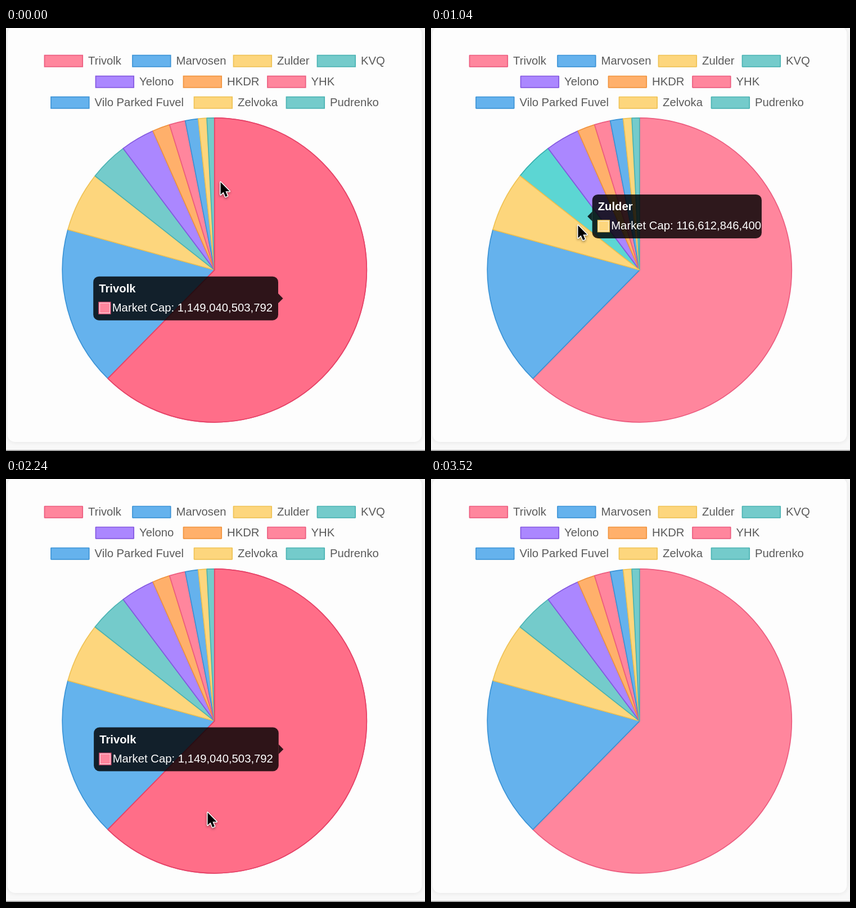
Animation of 745x752 px, one loop 3.6 s. Source, as an HTML page with a canvas:

```html
<!DOCTYPE html>
<html lang="en">
<head>
<meta charset="utf-8">
<style>
  html, body { margin: 0; width: 100%; height: 100%; overflow: hidden; background: #f8f8f8; }
  canvas { display: block; }
</style>
</head>
<body>
<canvas id="stage" width="745" height="752"></canvas>
<script>
const ctx = document.getElementById('stage').getContext('2d');
const LOOP = 3600, STEP = 80, LEAVE = 3000;
const CX = 370.8, CY = 430.3, R = 270.5;
const FONT = '20.3px "Liberation Sans", Arial, sans-serif';

// fill, border, hovered fill, hovered border
const RED = ['#ff869d', '#ec5c7f', '#ff6e89', '#e64267'];
const BLUE = ['#65b2ed', '#3b93d6', '#47acff', '#2e8bd8'];
const YELLOW = ['#fdd67d', '#efc255', '#ffd26e', '#eebb45'];
const TEAL = ['#74cbcb', '#4bb3b3', '#5bd7d4', '#37b0ae'];
const PURPLE = ['#ab87ff', '#8458e0', '#a57aff', '#7c4de0'];
const ORANGE = ['#ffb06b', '#f0943f', '#f9a456', '#ea8730'];

// name, value, palette, legend x, legend y
const slices = [
  ['Trivolk', 1149040503792, RED, 68.5, 48.5],
  ['Marvosen', 311748134198, BLUE, 225, 48.5],
  ['Zulder', 116612846400, YELLOW, 404.5, 48.5],
  ['KVQ', 76023415207, TEAL, 553.5, 48.5],
  ['Yelono', 66648898993, PURPLE, 159.5, 85.5],
  ['HKDR', 34312450376, ORANGE, 315.5, 85.5],
  ['YHK', 31204718265, RED, 465, 85.5],
  ['Vilo Parked Fuvel', 25318604912, BLUE, 80, 122.5],
  ['Zelvoka', 16702385144, YELLOW, 334.5, 122.5],
  ['Pudrenko', 14836271950, TEAL, 498.5, 122.5],
].map(([name, value, colors, lx, ly]) => ({
  name, value, colors, lx, ly, label: 'Market Cap: ' + value.toLocaleString('en-US'),
}));

ctx.font = FONT;
const total = slices.reduce((sum, s) => sum + s.value, 0);
let angle = -Math.PI / 2;
for (const s of slices) {
  s.start = angle;
  s.end = angle += s.value / total * 2 * Math.PI;
  const mid = (s.start + s.end) / 2;
  const px = CX + Math.cos(mid) * R / 2, w = ctx.measureText(s.label).width + 43.5;
  s.onRight = px > CX;
  s.box = [s.onRight ? px - 12 - w : px + 12, CY - 0.9 + Math.sin(mid) * R / 2, w];
}

// [time, hovered slice]
const hovers = [[-999, 0], [120, 9], [180, 8], [230, 7], [300, 6], [390, 5],
  [532, 4], [760, 3], [1033, 2], [1300, 1], [1965, 0]];
// [time, x, y]
const path = [[0, 381, 272], [560, 301, 298], [1040, 261, 349], [1400, 240, 440],
  [1760, 275, 537], [2240, 358, 591], [2440, 372, 594]];

const clamp = v => Math.min(1, Math.max(0, v));
const easeOut = ms => 1 - (1 - clamp(ms / 400)) ** 4;
const mix = (a, b, p) => a.map((v, i) => v + (b[i] - v) * p);
const hoverEnd = i => i + 1 < hovers.length ? hovers[i + 1][0] : LEAVE;

function hoverLevel(slice, t) {
  let level = 0;
  hovers.forEach(([start, index], i) => {
    if (index !== slice || t < start) return;
    const end = hoverEnd(i);
    level = Math.max(level, easeOut(Math.min(t, end) - start) * (1 - easeOut(t - end)));
  });
  return level;
}

function tooltipState(t) {
  let box = slices[0].box, current = slices[0];
  hovers.forEach(([start, index], i) => {
    if (t < start) return;
    current = slices[index];
    box = mix(box, current.box, easeOut(Math.min(t, hoverEnd(i)) - start));
  });
  return { box, current };
}

function cursorAt(t) {
  const i = path.findIndex((p, k) => k < path.length - 1 && t < path[k + 1][0]);
  if (i < 0) return null;
  const slope = k => {
    const a = path[Math.max(0, k - 1)], b = path[Math.min(path.length - 1, k + 1)];
    return [1, 2].map(c => (b[c] - a[c]) / (b[0] - a[0]));
  };
  const [a, b] = [path[i], path[i + 1]], d = b[0] - a[0], u = (t - a[0]) / d;
  const ma = slope(i), mb = slope(i + 1);
  return [0, 1].map(c => (1 + 2 * u) * (1 - u) ** 2 * a[c + 1] + u * (1 - u) ** 2 * d * ma[c]
    + u * u * (3 - 2 * u) * b[c + 1] + u * u * (u - 1) * d * mb[c]);
}

function polygon(...points) {
  ctx.beginPath();
  for (let i = 0; i < points.length; i += 2) ctx.lineTo(points[i], points[i + 1]);
  ctx.closePath();
}

function text(str, x, y, color, bold) {
  ctx.font = (bold ? 'bold ' : '') + FONT;
  ctx.fillStyle = color;
  ctx.fillText(str, x, y);
}

function drawPage() {
  ctx.fillStyle = '#f8f8f8';
  ctx.fillRect(0, 0, 745, 752);
  ctx.save();
  ctx.shadowColor = 'rgba(0,0,0,.09)';
  ctx.shadowBlur = 9;
  ctx.fillStyle = '#fdfdfd';
  ctx.beginPath();
  ctx.roundRect(2.5, -3, 737, 739, 14);
  ctx.fill();
  ctx.restore();
  ctx.fillStyle = '#8c8c8c';
  ctx.fillRect(0, 750.3, 745, 1.5);
  ctx.lineWidth = 1.7;
  for (const { name, colors, lx, ly } of slices) {
    ctx.fillStyle = colors[0];
    ctx.strokeStyle = colors[1];
    ctx.fillRect(lx, ly, 67.7, 20.3);
    ctx.strokeRect(lx, ly, 67.7, 20.3);
    text(name, lx + 77.5, ly + 16.5, '#5a5a5a');
  }
}

function drawSlice({ start, end, colors }, level) {
  ctx.beginPath();
  ctx.moveTo(CX, CY);
  ctx.arc(CX, CY, R, start, end);
  ctx.closePath();
  ctx.lineWidth = 1.7;
  ctx.lineJoin = 'bevel';
  for (const [k, alpha] of [[0, 1], [2, level]]) {
    ctx.globalAlpha = alpha;
    ctx.fillStyle = colors[k];
    ctx.strokeStyle = colors[k + 1];
    ctx.fill();
    ctx.stroke();
  }
  ctx.globalAlpha = 1;
}

function drawTooltip(t) {
  const { box: [x, cy, w], current } = tooltipState(t);
  const y = cy - 39, colors = current.colors;
  ctx.globalAlpha = 1 - clamp((t - LEAVE) / 200);
  ctx.fillStyle = 'rgba(0,0,0,.82)';
  const edge = current.onRight ? x + w : x, tip = edge + (current.onRight ? 8.6 : -8.6);
  ctx.beginPath();
  ctx.roundRect(x, y, w, 78, 10);
  ctx.fill();
  polygon(edge, cy - 8.6, tip, cy, edge, cy + 8.6);
  ctx.fill();
  text(current.name, x + 10, y + 28.3, '#fff', true);
  const square = (inset, color) => {
    ctx.fillStyle = color;
    ctx.fillRect(x + 10 + inset, y + 46 + inset, 20.4 - 2 * inset, 20.4 - 2 * inset);
  };
  square(-0.85, colors[1]);
  square(0.85, '#fff');
  square(1.7, colors[0]);
  text(current.label, x + 33.5, y + 62.3, '#fff');
  ctx.globalAlpha = 1;
}

function drawCursor([x, y]) {
  ctx.save();
  ctx.translate(x + 0.5, y + 1);
  ctx.scale(0.95, 0.95);
  polygon(0, 1, 0, 24.5, 5.4, 19.6, 9.2, 28.4, 13, 26.8, 9.3, 18.2, 16.8, 18.2);
  ctx.lineJoin = 'round';
  ctx.lineWidth = 3.2;
  ctx.strokeStyle = '#fff';
  ctx.shadowColor = 'rgba(0,0,0,.4)';
  ctx.shadowBlur = 4;
  ctx.shadowOffsetY = 2;
  ctx.stroke();
  ctx.shadowColor = 'transparent';
  ctx.fillStyle = '#000';
  ctx.fill();
  ctx.restore();
}

function draw(now) {
  const t = Math.floor(now % LOOP / STEP) * STEP;
  drawPage();
  const { current } = tooltipState(t);
  const active = t < LEAVE ? current : null;
  slices.forEach((s, i) => s !== active && drawSlice(s, hoverLevel(i, t)));
  if (active) drawSlice(active, hoverLevel(slices.indexOf(active), t));
  drawTooltip(t);
  const cursor = cursorAt(t);
  if (cursor) drawCursor(cursor);
  requestAnimationFrame(draw);
}
requestAnimationFrame(draw);
</script>
</body>
</html>
```
